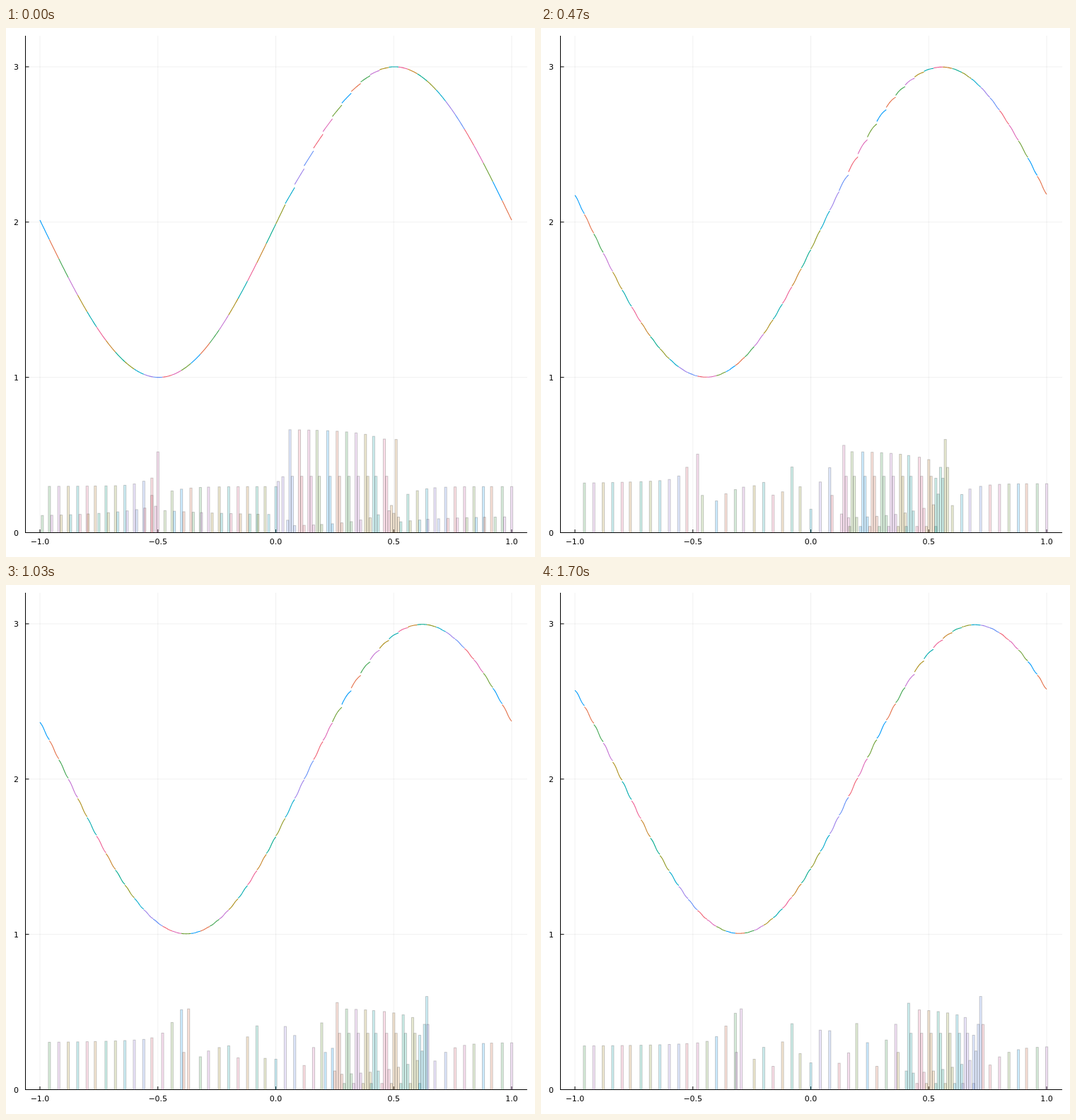
Animation of 748 by 749 pixels, one loop 1.73 s. Source, as an HTML page with a canvas:

```html
<!DOCTYPE html>
<html>
<head>
<meta charset="utf-8">
<style>
html, body { margin: 0; width: 100%; height: 100%; overflow: hidden; background: #fff; }
canvas { display: block; }
</style>
</head>
<body>
<canvas id="stage" width="748" height="749"></canvas>
<script>
const ctx = document.getElementById('stage').getContext('2d');
const LOOP = 1730, CELL = 0.04, TAU = 2 * Math.PI;
const palette = ['#009afa', '#e36f47', '#3ea44e', '#c371d2', '#ac8e18', '#00aaae', '#ed5e93', '#c68225',
  '#00a98d', '#8e971e', '#00a9cc', '#9b7fe9', '#618df6', '#f06073', '#dd65b6', '#6c9f33'];

const px = x => 381.5 + 333.5 * x;
const py = y => 714.5 - 219.85 * y;
const clamp = v => Math.max(0, Math.min(1, v));

function line(x1, y1, x2, y2, color) {
  ctx.strokeStyle = color;
  ctx.beginPath();
  ctx.moveTo(x1, y1);
  ctx.lineTo(x2, y2);
  ctx.stroke();
}

function axes() {
  const grid = 'rgba(0,0,0,.06)', ink = '#000';
  ctx.lineWidth = 1;
  ctx.font = '11px "DejaVu Sans", sans-serif';
  ctx.fillStyle = ink;
  ctx.textAlign = 'center';
  for (let i = -2; i <= 2; i++) {
    const x = px(i / 2);
    line(x, 11, x, 714.5, grid);
    line(x, 710, x, 714.5, ink);
    ctx.fillText((i < 0 ? '−' : '') + Math.abs(i / 2).toFixed(1), x, 731);
  }
  ctx.textAlign = 'right';
  for (let y = 0; y <= 3; y++) {
    line(28, py(y), 737, py(y), grid);
    line(28, py(y), 32.5, py(y), ink);
    ctx.fillText(y, 18, py(y) + 4);
  }
  line(27.5, 11, 27.5, 715, ink);
  line(27, 714.5, 737, 714.5, ink);
}

// col counts hundredths along x, height is in percent
function bar(col, height) {
  if (height < 0.6) return;
  const cell = Math.floor((col + 107) / 4);
  const x = px(col / 100) - (cell % 6 === 1 ? 1.8 : 0) - 1.5;
  const h = height * 2.1985;
  ctx.globalAlpha = 0.2;
  ctx.fillStyle = palette[cell % 16];
  ctx.fillRect(x, 714.5 - h, 3.1, h);
  ctx.strokeStyle = '#000';
  ctx.strokeRect(x, 714.5 - h, 3.1, h);
  ctx.globalAlpha = 1;
}

function bars(n, base, front) {
  const lowCol = -49.6 + 0.4 * n, highCol = lowCol + 100;
  const low = px(lowCol / 100), high = px(highCol / 100);
  const frontX = px((front - 25) * CELL);
  const grown = clamp(n / 8), early = clamp(1 - n / 4);

  // Cell edges behind the front, with a wave train trailing it
  for (let k = 1; k <= front + 1.2; k++) {
    const d = px(k * CELL - 1) - low;
    if (d > -2 && d < 9) continue;
    let h;
    if (d < 0) {
      h = base + (0.25 + 0.75 * grown) * (19 * Math.exp(-((d / 27) ** 2)) + 5 * Math.exp(d / 70));
    } else {
      const ramp = grown * clamp((k - 19) / (5 - n / 17));
      const calm = base * (1 - (0.2 + 0.4 * grown) * Math.exp(-d / 25));
      h = calm + ramp * (29 - calm + 14 * Math.cos(TAU * (k - front) / 3.65));
    }
    bar(4 * k - 100, h);
  }

  // Trough
  const dip = Math.round(lowCol);
  if (dip % 4) bar(dip, 52);
  bar(dip - 2, 24);

  // Groups between the front and the crest
  let first = null, last = 0;
  for (let c = 6; px(c / 100) <= high - 12.5; c += 4) {
    const x = px(c / 100), d = high - x;
    if (x < frontX + 18) continue;
    const lead = first === null;
    if (lead) first = c;
    last = c;
    bar(c, 52.5 + (lead ? 4 * grown : 0) - 9 * Math.exp(-d / 40) + 14 * early);
    bar(c + 1, 36.3);
    bar(c + 2, 9 + 14 * Math.exp(-d / 45) - 5 * early);
    bar(c + 3, 4 * clamp(n / 14));
  }
  const wide = px(first / 100) - frontX > 24;
  bar(first - 5, wide ? 33 : 24);
  if (wide) bar(first - 3, 36);
  bar(first - 1, wide ? 8 : 12);

  // Crest
  const top = Math.round(highCol + 1);
  for (let col = last + 3; col < top; col++) {
    bar(col, (0.5 + 0.5 * grown) * (34 + 10 * Math.cos(TAU * (col - last - 5.3) / 3)));
  }
  bar(top, 60);
  bar(top + 1, 10 + 32 * grown);

  // Cell edges after the crest
  for (let k = 38; k <= 50; k++) {
    const d = px(k * CELL - 1) - high;
    if (d < 13) continue;
    bar(4 * k - 100, base * (1 - (0.4 + 0.5 * grown) * Math.exp(-d / (60 - base * 1.3))));
  }

  // Short companions, fading out at the start
  for (let col = -99; early && col < 100; col += 4) {
    const d = px(col / 100) - low;
    if (col > 0 && col < highCol) continue;
    const h = col > 0 ? 10.5 - 4 * Math.exp((highCol - col) / 20)
      : d < 0 ? 10.5 + 7 * Math.exp(d / 65) : 11 + 3.5 * Math.exp(-d / 100);
    bar(col, h * early);
  }
}

function curve(n, base, front) {
  const s = 0.004 + 0.0038 * n, grown = clamp(n / 8);
  const size = 1 - 0.00012 * n;
  const ripple = grown * (0.003 - 0.0003 * (base - 27));
  ctx.lineWidth = 1.1;
  for (let k = 0; k < 50; k++) {
    const left = k * CELL - 1;
    const ahead = k > front + 1 && left + CELL < 0.48 + s;
    ctx.strokeStyle = palette[k % 16];
    ctx.beginPath();
    for (let q = 0; q < 1.01; q += 1 / 12) {
      // Each cell's error, as a small shift along x
      const shift = ahead
        ? 0.002 - 0.0065 * q + 0.004 * grown * Math.sin(Math.PI * q)
        : ripple * (1 - q - 0.8 * Math.sin(TAU * q));
      const x = left + q * CELL;
      ctx.lineTo(px(x), py(2 + size * Math.sin(Math.PI * (x - s + shift))));
    }
    ctx.stroke();
  }
}

function draw(time) {
  // Thirty steps a second, on a clock of 10 ms ticks
  const tick = Math.floor((time % LOOP) / 10);
  const n = Math.floor((tick * 10 + 4) * 0.03);
  const front = 24.1 + 0.19 * n;
  const base = 27 + 6 * Math.exp(-n / 50) * Math.cos(TAU * (n - 14) / 17);

  ctx.fillStyle = '#fff';
  ctx.fillRect(0, 0, 748, 749);
  axes();
  bars(n, base, front);
  curve(n, base, front);
}

const start = performance.now();
function loop() {
  draw(performance.now() - start);
  requestAnimationFrame(loop);
}
loop();
</script>
</body>
</html>
```
